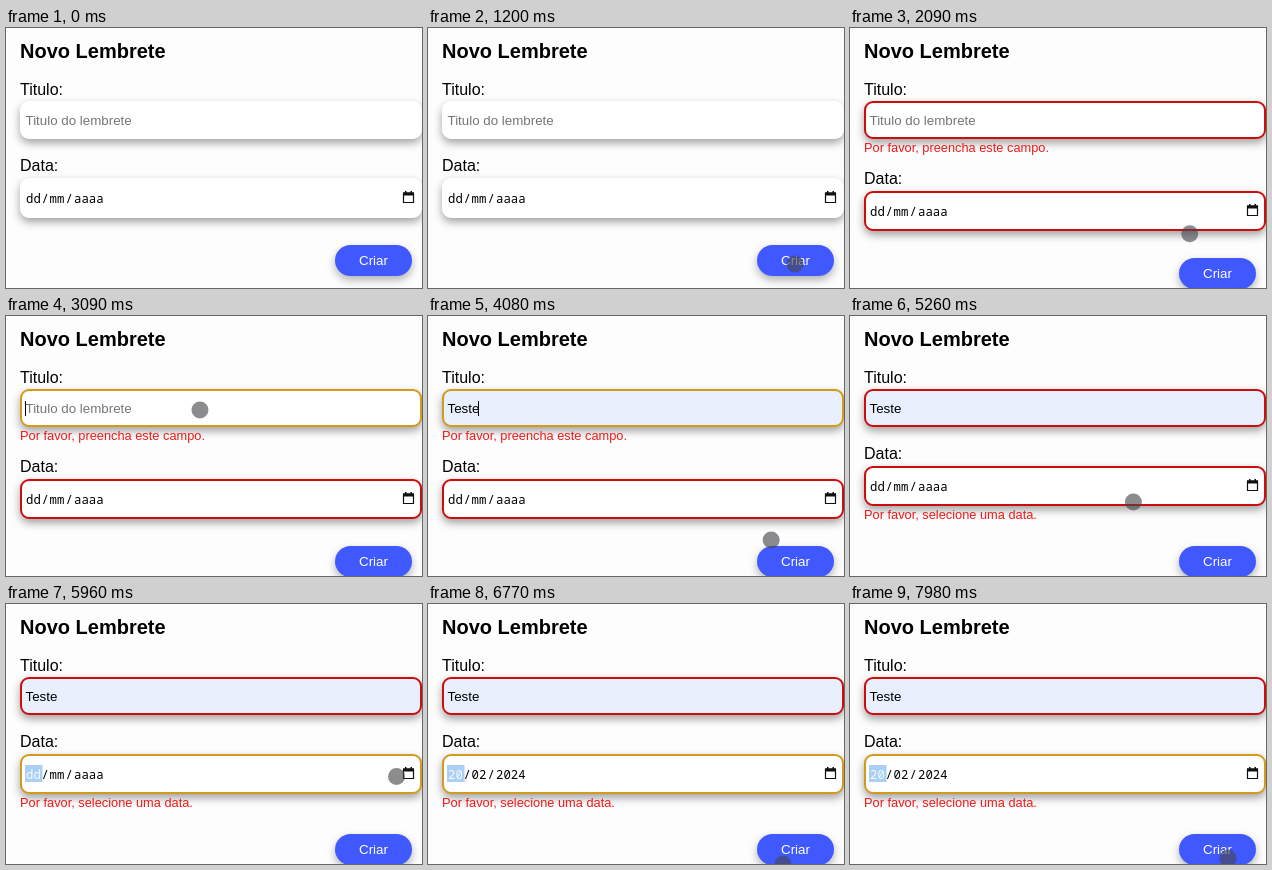
Write an HTML page that moves like this. It is 416x260 px and loops after 8 s.

```html
<!DOCTYPE html>
<html lang="pt">
<head>
<meta charset="utf-8">
<title>Novo Lembrete</title>
<style>
  html, body { margin: 0; width: 100%; height: 100%; overflow: hidden; background: #fdfdfd; }
  svg { display: block; font: 13.333px "Liberation Sans", Arial, sans-serif; }
  h1, .title { font-size: 20px; font-weight: bold; }
  .label { font-size: 16px; }
  .error { font-size: 12.8px; fill: #f01a1a; }
  .field { fill: #fff; stroke-width: 2; filter: drop-shadow(0 4px 4px rgba(0, 0, 0, .36)); }
  .button { fill: #4059ff; filter: drop-shadow(0 4px 4px rgba(0, 0, 0, .3)); }
  .date { font: 12.3px "Noto Sans Mono", monospace; }
</style>
</head>
<body>
<svg width="416" height="260" viewBox="0 0 416 260">
  <text class="title" x="14" y="30">Novo Lembrete</text>
  <text class="label" x="14" y="67">Titulo:</text>
  <rect id="titleBox" class="field" x="15" y="74" width="400" height="36" rx="8"/>
  <text id="titleText" x="19.5" y="97"></text>
  <rect id="caret" y="85" width="1" height="15"/>
  <text id="titleError" class="error" x="14" y="124">Por favor, preencha este campo.</text>

  <g id="dateGroup">
    <text class="label" x="14" y="143">Data:</text>
    <rect id="dateBox" class="field" x="15" y="151" width="400" height="38" rx="8"/>
    <rect id="selection" x="19" y="161" width="17.5" height="17" fill="#acd0f4"/>
    <g class="date">
      <text id="day" x="20" y="174.5"></text>
      <text x="35.5" y="174.5">/</text>
      <text id="month" x="43.5" y="174.5"></text>
      <text x="59.5" y="174.5">/</text>
      <text id="year" x="68" y="174.5"></text>
    </g>
    <path d="M397.5 165h10v9.5h-10z" fill="none" stroke="#111" stroke-width="1.2"/>
    <path d="M397 164.5h11v3h-11zM399 163h1.5v2h-1.5zM404.5 163h1.5v2h-1.5z" fill="#111"/>
  </g>
  <text id="dateError" class="error" x="14" y="203">Por favor, selecione uma data.</text>

  <g id="buttonGroup">
    <rect class="button" x="329" y="217" width="77" height="31" rx="15.5"/>
    <text x="353" y="237" fill="#fff">Criar</text>
  </g>
  <circle id="pointer" r="8.5" fill="rgba(70, 70, 74, .62)"/>
</svg>
<script>
  const LOOP = 8000;
  const RED = '#cf0c0c', GOLD = '#d39a1c';
  const el = id => document.getElementById(id);
  const set = (id, attrs) => {
    for (const name in attrs) el(id).setAttribute(name, attrs[name]);
  };
  const show = (id, on) => set(id, { visibility: on ? 'visible' : 'hidden' });
  const write = (id, text, fill = '#000') => {
    el(id).textContent = text;
    set(id, { fill });
  };

  // Moments of the interaction, in ms
  const SUBMIT = 1580, FOCUS_TITLE = 2780, FILL = 3670, BLUR_TITLE = 4410,
        RESUBMIT = 4570, FOCUS_DATE = 5670, PICK_DATE = 6560;

  // Pointer path: time, x, y
  const path = [
    [310, 300, 272], [1090, 367, 236], [1890, 367, 236], [2090, 340, 206],
    [2690, 194, 94], [3090, 194, 94], [3470, 185, 134], [3780, 185, 134],
    [4080, 343, 224], [4260, 368, 243], [4680, 368, 243], [5260, 283, 186],
    [5560, 391, 172], [5960, 391, 172], [6160, 300, 275], [6560, 300, 275],
    [6860, 378, 254], [LOOP, 378, 254]
  ];

  function pointerAt(t) {
    const next = path.findIndex(p => p[0] > t);
    if (next < 1) return path[0].slice(1);
    const [t0, x0, y0] = path[next - 1], [t1, x1, y1] = path[next];
    const k = (t - t0) / (t1 - t0);
    return [x0 + (x1 - x0) * k, y0 + (y1 - y0) * k];
  }

  function draw(t) {
    const submitted = t >= SUBMIT;
    const filled = t >= FILL;
    const titleFocus = t >= FOCUS_TITLE && t < BLUR_TITLE;
    const dateFocus = t >= FOCUS_DATE;
    const picked = t >= PICK_DATE;
    const titleError = submitted && t < RESUBMIT;
    const border = focus => focus ? GOLD : submitted ? RED : '#fff';

    set('titleBox', { stroke: border(titleFocus), style: `fill:${filled ? '#e8f0fe' : '#fff'}` });
    write('titleText', filled ? 'Teste' : 'Titulo do lembrete', filled ? '#000' : '#757575');
    const blink = (t - (filled ? FILL : FOCUS_TITLE)) % 1000 < 500;
    show('caret', titleFocus && blink);
    set('caret', { x: filled ? 50 : 19 });
    show('titleError', titleError);

    set('dateGroup', { transform: `translate(0 ${titleError ? 13 : 0})` });
    set('dateBox', { stroke: border(dateFocus) });
    show('selection', dateFocus);
    write('day', picked ? '20' : 'dd', dateFocus ? '#f4f9ff' : '#000');
    write('month', picked ? '02' : 'mm');
    write('year', picked ? '2024' : 'aaaa');
    show('dateError', t >= RESUBMIT);

    set('buttonGroup', { transform: `translate(0 ${submitted ? 13 : 0})` });
    const [cx, cy] = pointerAt(t);
    set('pointer', { cx, cy });
  }

  function tick() {
    draw(performance.now() % LOOP);
    requestAnimationFrame(tick);
  }
  tick();
</script>
</body>
</html>
```
